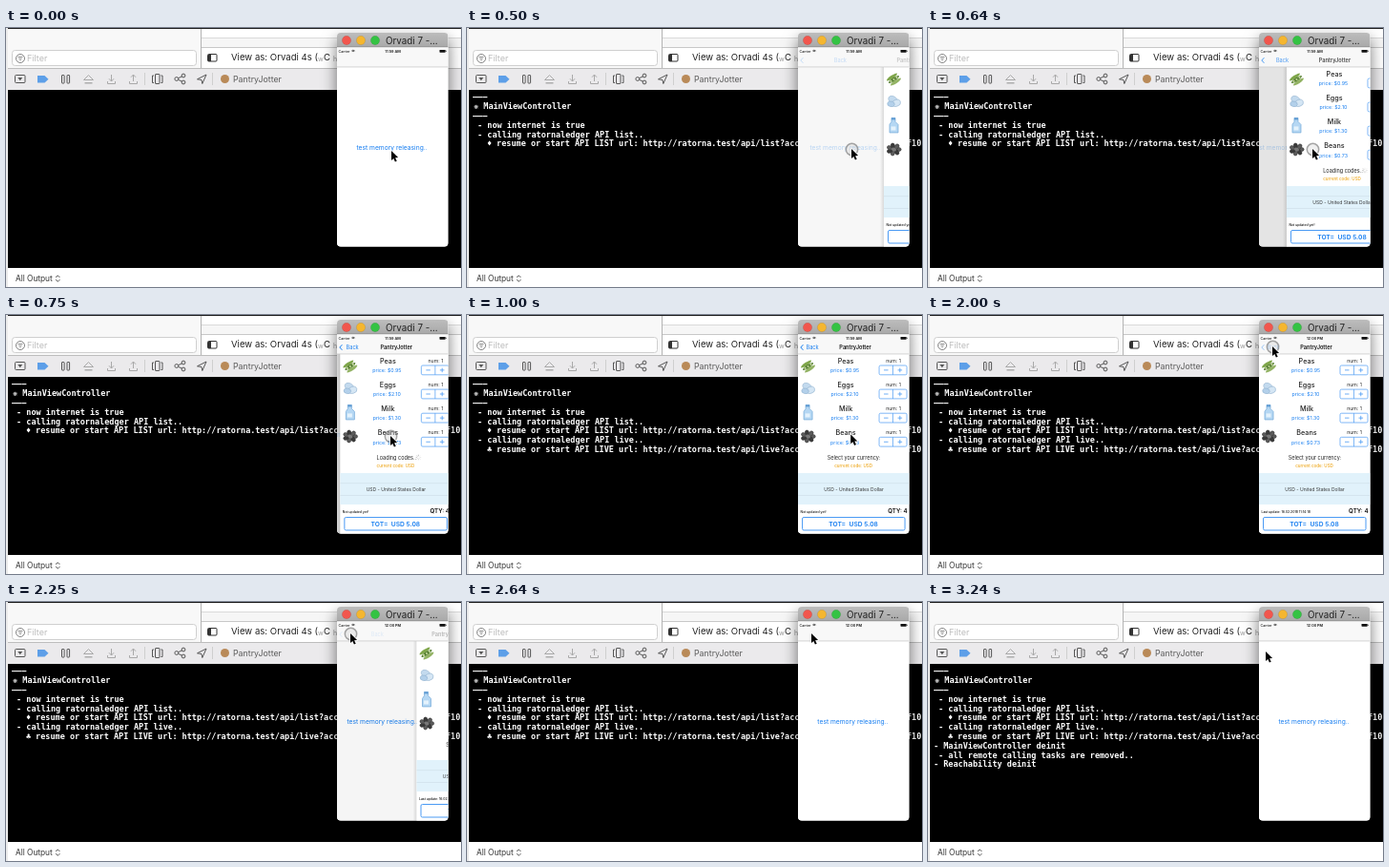
Write an HTML page with a canvas that moves like this. It is 477 px wide and 272 px high and loops after 3290 ms.

```html
<!DOCTYPE html>
<html lang="en">
<head>
<meta charset="utf-8">
<title>Memory release demo</title>
<style>
html, body { margin: 0; width: 100%; height: 100%; overflow: hidden; background: #fff; }
canvas { display: block; width: 477px; height: 272px; }
</style>
</head>
<body>
<canvas id="stage"></canvas>
<script>
const W = 477, H = 272, LOOP = 3290;
const canvas = document.getElementById('stage');
const dpr = window.devicePixelRatio || 1;
canvas.width = Math.round(W * dpr);
canvas.height = Math.round(H * dpr);
const c = canvas.getContext('2d');

const SANS = 'Inter, "Open Sans", sans-serif';
const MONO = '"DejaVu Sans Mono", monospace';
const BLUE = '#147cf0';
const PHONE = { x: 347, y: 5, w: 116.5, h: 224.5 };
const APP = 'PantryJotter';
const HOST = 'http://ratorna.test/api/';
const TAIL = '?access_key=' + '0'.repeat(13) + '/f10c';

function rect(x, y, w, h, color) {
  c.fillStyle = color;
  c.fillRect(x, y, w, h);
}
function box(x, y, w, h, r, fill, stroke, lw = 1) {
  c.beginPath();
  c.roundRect(x, y, w, h, r);
  if (fill) { c.fillStyle = fill; c.fill(); }
  if (stroke) { c.strokeStyle = stroke; c.lineWidth = lw; c.stroke(); }
}
function oval(x, y, rx, ry, rot, fill, stroke, lw = 1) {
  c.beginPath();
  c.ellipse(x, y, rx, ry, rot, 0, Math.PI * 2);
  if (fill) { c.fillStyle = fill; c.fill(); }
  if (stroke) { c.strokeStyle = stroke; c.lineWidth = lw; c.stroke(); }
}
function path(pts, fill, stroke, lw = 1, close = true) {
  c.beginPath();
  pts.forEach(([x, y], i) => i ? c.lineTo(x, y) : c.moveTo(x, y));
  if (close) c.closePath();
  if (fill) { c.fillStyle = fill; c.fill(); }
  if (stroke) { c.strokeStyle = stroke; c.lineWidth = lw; c.stroke(); }
}
const line = (pts, color, lw) => path(pts, null, color, lw, false);

// y is the middle of the capital letters
function text(s, x, y, size, color, { weight = 400, align = 'left', font = SANS } = {}) {
  c.font = `${weight} ${size}px ${font}`;
  c.textAlign = align;
  c.textBaseline = 'alphabetic';
  c.fillStyle = color;
  c.fillText(s, x, y + size * 0.36);
}
function faded(alpha, draw) {
  c.save();
  c.globalAlpha *= alpha;
  draw();
  c.restore();
}

function topPane() {
  rect(0, 0, W, H, '#fff');
  rect(2, 1, 202, 41, '#f8f8f8');
  rect(205, 11, 272, 9, '#f6f6f6');
  rect(205, 10, 272, 1, '#dadada');
  rect(205, 20, 272, 1, '#c8c8c8');
  rect(204, 1, 1, 41, '#b4b4b4');
  rect(2, 0, 475, 1, '#222');
  box(6.5, 23.5, 193, 16, 3, '#fff', '#cfcfcf');
  oval(15, 32, 4.5, 4.5, 0, null, '#777', 0.9);
  [2.6, 1.7, 0.8].forEach((w, i) => rect(15 - w, 29.8 + i * 1.8, w * 2, 0.8, '#777'));
  text('Filter', 22, 32, 9, '#bcbcbc');
  box(211.5, 27.5, 9.5, 7.5, 1, '#fff', '#333');
  rect(212, 28, 3, 7, '#333');
  text('View as: Orvadi 4s (', 236, 31, 9.6, '#222');
  text('w', 327, 32, 7, '#999');
  text('C', 333, 31, 9.6, '#222');
  text('h', 343, 32, 7, '#999');
}

function debugBar() {
  const dark = '#555', pale = '#a9a9a9';
  rect(2, 42, 475, 23, '#ebeaec');
  rect(2, 42, 475, 1, '#bdbdbd');
  box(9.5, 49.5, 10.5, 8, 1, null, dark);
  path([[12.3, 52], [17.3, 52], [14.8, 55.2]], dark);
  path([[33, 50], [40.5, 50], [44.5, 53.8], [40.5, 57.6], [33, 57.6]], '#5d9fe8');
  box(58.5, 49.5, 2.6, 8.5, 0.5, null, dark);
  box(64, 49.5, 2.6, 8.5, 0.5, null, dark);
  path([[81.5, 54.5], [86.5, 49.5], [91.5, 54.5]], null, pale);
  line([[82.5, 57.8], [90.5, 57.8]], pale, 1.4);
  [[110.5, 1], [133.5, -1]].forEach(([x, dir]) => {
    line([[x, 49], [x, 56]], pale);
    const tip = dir > 0 ? 56 : 49;
    line([[x - 2.5, tip - 2.7 * dir], [x, tip], [x + 2.5, tip - 2.7 * dir]], pale);
    line([[x - 4, 56], [x - 4, 58.5], [x + 4, 58.5], [x + 4, 56]], pale);
  });
  rect(145, 47, 1, 13, '#cfcfcf');
  box(156.5, 48.5, 4.5, 10, 0.5, null, dark);
  line([[155, 50], [153.5, 50], [153.5, 57.5], [155, 57.5]], dark);
  line([[162.5, 50], [164, 50], [164, 57.5], [162.5, 57.5]], dark);
  line([[185.5, 50.3], [179, 53.5], [185.5, 56.7]], dark);
  [[186, 50], [178.8, 53.5], [186, 57]].forEach(([x, y]) => oval(x, y, 1.9, 1.9, 0, '#ebeaec', dark));
  path([[200.5, 53.8], [210, 49], [205.8, 58.5], [205, 54.5]], null, dark);
  rect(216, 47, 1, 13, '#cfcfcf');
  oval(229.5, 53.5, 4.5, 4.5, 0, '#b98a58');
  text(APP, 238, 53.5, 8.8, '#5c5c5c');
}

function consolePane(t) {
  rect(2, 65, 475, 187, '#000');
  rect(0, 0, 2, H, '#ececec');
  const row = (i, col, s, mark) => {
    const x = 6 + col * 5.12, y = 72.3 + i * 9.8;
    const opt = { weight: 700, font: MONO };
    if (mark) text(mark, x - 10.2, y, 8.5, '#fff', opt);
    text(s, x, y, 8.5, '#fff', opt);
  };
  if (t >= 450) {
    row(0, 0, '–––');
    row(1, 2.2, 'MainViewController', '❋');
    row(2, 0, '–––');
    row(3, 1, '- now internet is true');
    row(4, 1, '- calling ratornaledger API list..');
    row(5, 4.9, 'resume or start API LIST url: ' + HOST + 'list' + TAIL, '♦');
  }
  if (t >= 1000) {
    row(6, 1, '- calling ratornaledger API live..');
    row(7, 4.9, 'resume or start API LIVE url: ' + HOST + 'live' + TAIL, '♣');
  }
  if (t >= 2690) {
    row(8, 0, '- MainViewController deinit');
    row(9, 1, '- all remote calling tasks are removed..');
    row(10, 0, '- Reachability deinit');
  }
  rect(2, 252, 475, 20, '#fff');
  text('All Output', 10, 263, 8.3, '#333');
  line([[52.2, 262], [54.3, 259.8], [56.4, 262]], '#444', 0.9);
  line([[52.2, 264.2], [54.3, 266.4], [56.4, 264.2]], '#444', 0.9);
}

const icons = [
  (x, y) => {
    [[-2, -2.5], [0, 0], [2, 2.5]].forEach(([dx, dy], i) =>
      oval(x + dx, y + dy, 6.5, 1.7, -0.6, ['#7fa64a', '#4f7a2c', '#93b364'][i]));
    [-3, 0, 3].forEach(d => oval(x + d, y - d * 0.65, 1.1, 1.1, 0, '#c4d69a'));
  },
  (x, y) => {
    oval(x - 1, y - 2, 5, 3.6, 0.5, '#c3daee', '#93b3cf', 0.6);
    oval(x + 2.5, y + 1.5, 4.6, 3.5, -0.3, '#d5e6f4', '#8fb0cf', 0.6);
    oval(x - 3, y + 2.5, 3.8, 2.8, 0.2, '#b3d0ea', '#8fb0cf', 0.6);
  },
  (x, y) => {
    path([[x - 2.5, y - 8], [x + 1.5, y - 8], [x + 1.5, y - 4], [x + 4.5, y - 1], [x + 4.5, y + 7.5],
      [x - 4.5, y + 7.5], [x - 4.5, y - 1], [x - 2.5, y - 4]], '#b5d7f3', '#7aaedb', 0.8);
    rect(x - 2.5, y - 8, 4, 2, '#5f9bd2');
    rect(x - 3, y + 1, 5, 4, '#e4f2fc');
  },
  (x, y) => {
    for (let i = 0; i < 7; i++) {
      const a = i * 0.9;
      oval(x + Math.cos(a) * 4.8, y + Math.sin(a) * 3.8, 2.9, 2.1, a, i % 2 ? '#3a3a3a' : '#5b5b5b', '#2a2a2a', 0.5);
    }
    oval(x, y, 2.6, 1.8, 0.4, '#777');
  }
];
const goods = [['Peas', '$0.95'], ['Eggs', '$2.10'], ['Milk', '$1.30'], ['Beans', '$0.73']];
const rolling = ['AUD - Australian Dollar', 'CHF - Swiss Franc', 'JPY - Japanese Yen',
  'NOK - Norwegian Krone', 'XAF - CFA Franc BEAC', 'RON - Romanian Leu'];

// Coordinates are those of the page at rest
function listPage(t) {
  const mid = { align: 'center' };
  rect(PHONE.x, 41, PHONE.w, 190, '#fff');
  goods.forEach(([name, price], i) => {
    const y = 48 + i * 25.1;
    icons[i](357.5, y + (i ? 4.2 : 6));
    text(name, 397, y, 7.2, '#222', { ...mid, weight: 500 });
    text('price: ' + price, 396, y + 10.3, 5.3, BLUE, mid);
    text('num: 1', 447, y, 5.2, '#222', mid);
    box(432, y + 5, 29, 9.8, 1.5, null, '#4a9af4', 0.7);
    rect(446.2, y + 5, 0.7, 9.8, '#4a9af4');
    rect(437, y + 9.5, 4.5, 0.8, '#4a9af4');
    rect(451.5, y + 9.5, 4.6, 0.8, '#4a9af4');
    rect(453.4, y + 7.6, 0.8, 4.6, '#4a9af4');
  });

  const loaded = t >= 1000;
  if (loaded) text('Select your currency:', 405.5, 150, 5.5, '#222', mid);
  else {
    text('Loading codes..', 406, 150, 5.5, '#222', mid);
    for (let i = 0; i < 8; i++) {
      const a = i * Math.PI / 4, shade = 0.15 + ((i + 8 - Math.floor(t / 100) % 8) % 8) / 14;
      line([[429 + Math.cos(a) * 1.3, 149.5 + Math.sin(a) * 1.3],
        [429 + Math.cos(a) * 2.8, 149.5 + Math.sin(a) * 2.8]], `rgba(90,90,90,${shade})`, 0.6);
    }
  }
  text('current code: USD', 405, 158, 4.5, '#eda414', { ...mid, weight: 500 });

  rect(PHONE.x, 166, PHONE.w, 33, '#e1f2fb');
  rect(PHONE.x, 176.5, PHONE.w, 0.6, '#cbdde6');
  rect(PHONE.x, 189, PHONE.w, 0.6, '#cbdde6');
  if (t >= 1250 && t < 1500) {
    const i = Math.floor((t - 1250) / 50);
    text(rolling[i], 405, 183, 5.1, '#222', mid);
    faded(0.45, () => text(rolling[i + 1], 405, 190, 5, '#444', mid));
  } else text('USD - United States Dollar', 405.5, 183, 5, '#333', mid);

  text(t >= 1200 ? 'Last update: 16.02.2018 11:14:18' : 'Not updated yet!', 349.5, 206.5, 3.4, '#111', { weight: 500 });
  text('QTY: 4', 461.5, 206, 6.2, '#111', { align: 'right', weight: 600 });
  box(351.5, 212.5, 107.5, 13.5, 1.5, '#fff', '#4a9af4', 1);
  text('TOT=  USD 5.08', 405, 219.3, 6.7, BLUE, { ...mid, weight: 600 });
}

// Critically damped spring, 0 to 1
function spring(ms) {
  if (ms <= 0) return 0;
  const k = ms * 0.018;
  return 1 - (1 + k) * Math.exp(-k);
}

function navBar(t, p) {
  rect(PHONE.x, 20, PHONE.w, 21, '#f8f8f8');
  rect(PHONE.x, 40.6, PHONE.w, 0.7, '#c4c4c4');
  if (p > 0.005) faded(p, () => {
    text(APP, 407 + 78 * (1 - p), 34, 5.6, '#111', { align: 'center', weight: 600 });
    faded(t >= 2000 ? 0.4 : 1, () => {
      line([[352.4, 31.2], [349.8, 34], [352.4, 36.8]], BLUE, 1);
      text('Back', 355.5 + 38 * (1 - p), 34, 5.6, BLUE);
    });
  });
  text('Carrier', 348.5, 24.3, 3.6, '#222', { weight: 500 });
  [2.4, 1.3].forEach(r => {
    c.beginPath();
    c.arc(364, 25.7, r, -2.4, -0.74);
    c.strokeStyle = '#222';
    c.lineWidth = 0.7;
    c.stroke();
  });
  text(t < 1800 ? '11:59 AM' : '12:00 PM', 405.5, 24.3, 3.8, '#111', { align: 'center', weight: 600 });
  box(454.5, 22.9, 6.2, 2.8, 0.6, '#111');
  rect(461, 23.7, 0.6, 1.2, '#111');
}

function phone(t) {
  const { x, y, w, h } = PHONE;
  c.save();
  c.shadowColor = 'rgba(0,0,0,.55)';
  c.shadowBlur = 16 * dpr;
  c.shadowOffsetY = 7 * dpr;
  box(x, y, w, h, 4, '#fff');
  c.restore();

  c.save();
  c.beginPath();
  c.roundRect(x, y, w, h, 4);
  c.clip();
  const p = t < 2110 ? spring(t - 450) : 1 - spring(t - 2110);
  const left = x + w * (1 - p);
  rect(x, 20, w, 210, '#fff');
  const ink = t < 100 || t >= 2100 ? 1 : t < 150 ? 0.55 : 0.28;
  faded(ink, () => text('test memory releasing..', 404.5 - w * 0.3 * p, 126, 6.7, BLUE, { align: 'center' }));
  if (p > 0.002) {
    rect(x, 41, w, 190, `rgba(0,0,0,${0.14 * p})`);
    const g = c.createLinearGradient(left - 4, 0, left, 0);
    g.addColorStop(0, 'rgba(0,0,0,0)');
    g.addColorStop(1, 'rgba(0,0,0,.12)');
    rect(left - 4, 41, 4, 190, g);
    c.save();
    c.translate(left - x, 0);
    listPage(t);
    c.restore();
  }
  navBar(t, p);

  const bar = c.createLinearGradient(0, 5, 0, 20);
  bar.addColorStop(0, '#bcbcbc');
  bar.addColorStop(1, '#a9a9a9');
  rect(x, y, w, 15, bar);
  rect(x, 19.5, w, 0.7, '#8b8b8b');
  ['#f2564d', '#f5b62f', '#34c343'].forEach((color, i) =>
    oval(357 + i * 15, 13, 4.7, 4.7, 0, color, 'rgba(0,0,0,.15)', 0.6));
  text('Orvadi 7 -...', 398, 13.2, 9.8, '#222');
  c.restore();
}

const route = [[0, 404, 129], [50, 404, 129], [100, 403, 127], [950, 403, 127], [1450, 375, 67],
  [1500, 375, 67], [1950, 361, 33], [2640, 361, 33], [2790, 354.5, 51.5], [3190, 354.5, 51.5], [3240, 354, 52]];

function pointer(t) {
  let i = 0;
  while (i < route.length - 2 && t >= route[i + 1][0]) i++;
  const [t0, x0, y0] = route[i], [t1, x1, y1] = route[i + 1];
  const u = Math.min(1, (t - t0) / (t1 - t0)), e = u * u * (3 - 2 * u);
  const x = x0 + (x1 - x0) * e, y = y0 + (y1 - y0) * e;

  const pressed = (t >= 300 && t < 850) || (t >= 1950 && t < 2500);
  if (pressed) oval(x + 0.5, y + 0.5, 6.2, 6.2, 0, 'rgba(190,190,190,.25)', 'rgba(120,120,120,.65)', 1.5);
  const shape = [[0, 0], [0, 10], [2.3, 7.9], [3.9, 11.6], [5.7, 10.8], [4.1, 7.3], [7.1, 7.1]];
  c.lineJoin = 'round';
  path(shape.map(([a, b]) => [x + a, y + b]), null, '#fff', 1.6);
  path(shape.map(([a, b]) => [x + a, y + b]), '#000');
  c.lineJoin = 'miter';
}

function draw(now) {
  const ms = now % LOOP;
  const shift = ms < 2540 ? 0 : 40;
  const t = Math.floor((ms - shift) / 50) * 50 + shift;
  c.setTransform(dpr, 0, 0, dpr, 0, 0);
  topPane();
  debugBar();
  consolePane(t);
  phone(t);
  pointer(t);
}

const start = performance.now();
function tick() {
  draw(performance.now() - start);
  requestAnimationFrame(tick);
}
tick();
</script>
</body>
</html>
```
